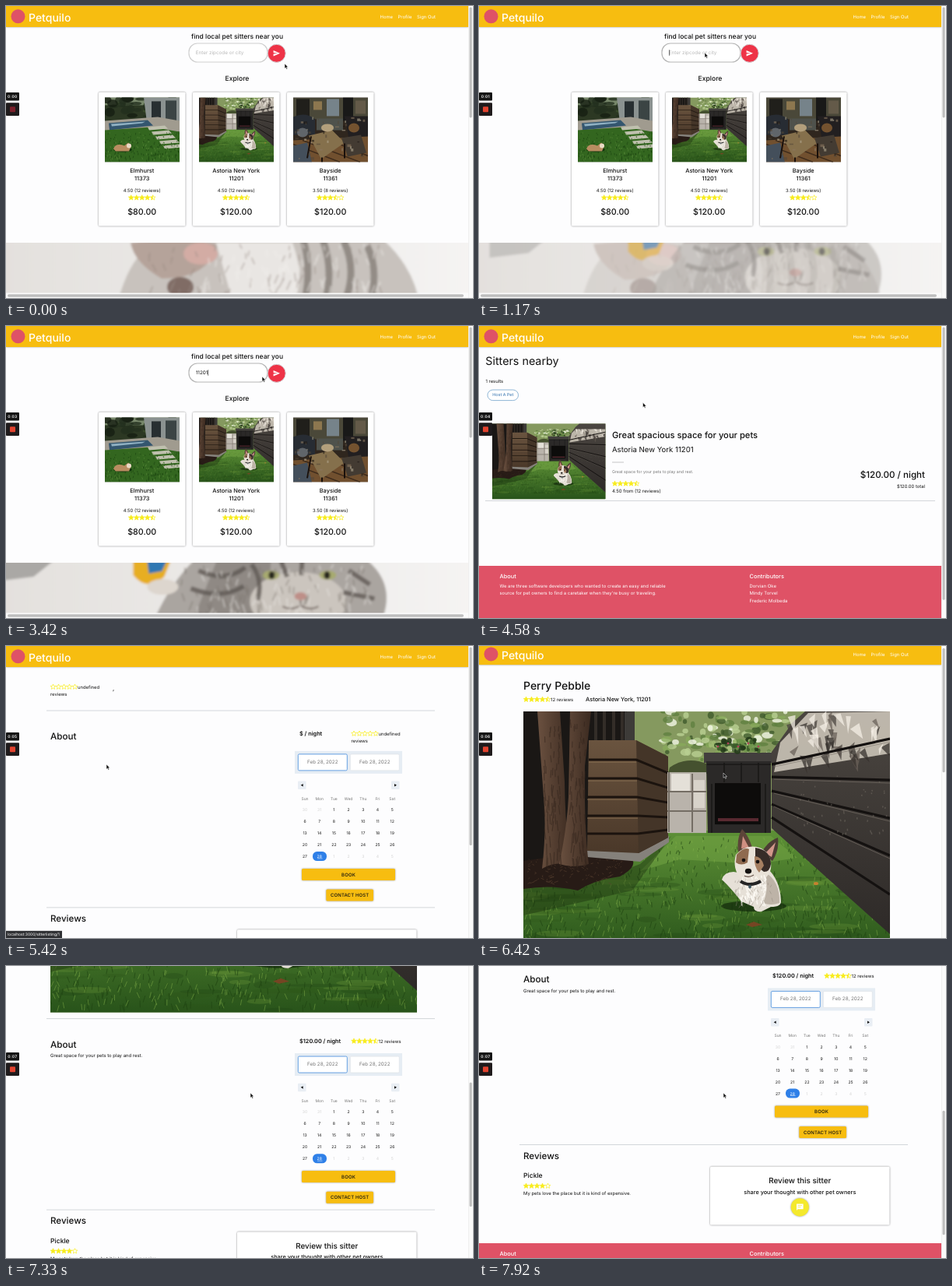
An HTML page that plays this animation: 600x375 px, repeating every 8000 ms.

```html
<!DOCTYPE html>
<html lang="en">
<head>
<meta charset="utf-8">
<title>Pet sitters</title>
<style>
  html, body { margin: 0; width: 100%; height: 100%; overflow: hidden; background: #fdfdfe; }
  svg { display: block; }
  #stage { width: 600px; height: 375px; font-family: Inter, "Open Sans", sans-serif; text-rendering: geometricPrecision; }
  text { fill: #111; white-space: pre; }
  .mid { text-anchor: middle; }
  .end { text-anchor: end; }
  .m { font-weight: 500; }
  .w { fill: #fff; }
  .card { filter: drop-shadow(0 .5px 1px #0007); }
  .btn { filter: drop-shadow(0 .7px .8px #0006); }
</style>
</head>
<body>
<svg id="stage" viewBox="0 0 600 375"></svg>
<script>
const YELLOW = '#f7bd10', RED = '#df5266', STAR = '#f8ec1c', LOOP = 8000, FRAME = 1000 / 12;
const stage = document.getElementById('stage');
const $ = id => document.getElementById(id);

let seed = 7;
const rnd = (a = 0, b = 1) => {
  seed = (seed * 16807) % 2147483647;
  return +(a + (b - a) * seed / 2147483647).toFixed(1);
};
const range = (n, f) => Array.from({ length: n }, (_, i) => f(i)).join('');
const pick = list => list[Math.floor(rnd(0, list.length - .1))];

// markup helpers
const T = (x, y, size, str, cls = '', o = '') => `<text x="${x}" y="${y}" font-size="${size}" class="${cls}" ${o}>${str}</text>`;
const R = (x, y, w, h, fill, o = '') => `<rect x="${x}" y="${y}" width="${w}" height="${h}" fill="${fill}" ${o}/>`;
const P = (d, fill, o = '') => `<path d="${d}" fill="${fill}" ${o}/>`;
const S = (d, color, w, o = '') => P(d, 'none', `stroke="${color}" stroke-width="${w}" ${o}`);
const E = (x, y, rx, ry, fill, o = '') => `<ellipse cx="${x}" cy="${y}" rx="${rx}" ry="${ry}" fill="${fill}" ${o}/>`;
const G = (id, body, o = '') => `<g id="${id}" ${o}>${body}</g>`;
const line = (x1, x2, y) => R(x1, y - .4, x2 - x1, .8, '#c9cdd1');
const grad = (id, c1, c2, o = 'x2="0" y2="1"') =>
  `<linearGradient id="${id}" ${o}><stop stop-color="${c1}"/><stop offset="1" stop-color="${c2}"/></linearGradient>`;
const photo = (id, x, y, w, h, vb, o = '') =>
  `<svg x="${x}" y="${y}" width="${w}" height="${h}" viewBox="0 0 ${vb}" preserveAspectRatio="xMidYMid slice" ${o}><use href="#${id}"/></svg>`;

const starPath = (cx, cy, from) => 'M' + Array.from({ length: 11 - from }, (_, i) => {
  const k = i + from, r = k % 2 ? 1.55 : 3.5, a = (k * 36 - 90) * Math.PI / 180;
  return (cx + r * Math.cos(a)).toFixed(2) + ' ' + (cy + r * Math.sin(a)).toFixed(2);
}).join('L') + 'Z';
const stars = (x, y, n) => range(5, i => {
  const cx = x + 3.5 + i * 7;
  return P(starPath(cx, y, 0), n > i + .9 ? STAR : '#fff', `stroke="${STAR}" stroke-width=".7"`) +
    (n > i && n < i + 1 ? P(starPath(cx, y, 5), STAR) : '');
});

const nav = () => R(0, 0, 594, 27, YELLOW, 'class="btn"') +
  E(15.5, 13.3, 9, 9, RED) + T(29, 20.3, 14, 'Petquilo', 'm w') +
  T(480.5, 15.6, 5.9, 'Home', 'w') + T(503.5, 15.6, 5.9, 'Profile', 'w') + T(528, 15.6, 5.9, 'Sign Out', 'w');

const footer = y => R(0, y, 594, 95, RED) +
  T(26.5, y + 15.7, 7.4, 'About', 'm w') +
  T(26.5, y + 27.8, 5.9, 'We are three software developers who wanted to create an easy and reliable', 'w') +
  T(26.5, y + 37.2, 5.9, "source for pet owners to find a caretaker when they're busy or traveling.", 'w') +
  T(347.5, y + 15.7, 7.4, 'Contributors', 'm w') +
  ['Dorvian Oke', 'Mindy Torvel', 'Frederic Molbeda'].map((n, i) => T(347.5, y + 27.8 + i * 9.4, 5.9, n, 'w')).join('');

// pictures
const tufts = (n, x1, x2, y1, y2, dx, dy) => 'M' + range(n, () => {
  const y = rnd(y1, y2), k = .4 + .6 * (y - y1) / (y2 - y1);
  return `M${rnd(x1, x2)} ${y}l${(rnd(-dx, dx) * k).toFixed(1)} ${(dy * k).toFixed(1)}`;
}).slice(1);

const foliage = () => R(0, 0, 471, 314, '#85995f') +
  range(150, () => E(rnd(180, 350), rnd(0, 62), rnd(2, 8), rnd(2, 5), pick(['#f2f6e6', '#5f8040', '#b9cf92', '#3f5a2c', '#87a95a']), 'opacity=".8"')) +
  P('M188 72Q210 56 238 68V80H186Z', '#45512f');

const lawn = () => P('M0 226L140 187L190 153H325L471 285V314H0Z', 'url(#lawn)') +
  P('M196 160H318L352 188L300 196L200 190L150 205Z', '#74a444', 'opacity=".55"') +
  range(60, () => E(rnd(0, 440), rnd(215, 312), rnd(12, 40), rnd(2, 5), pick(['#1f4212', '#6f9c3c', '#2b5418']), 'opacity=".28"')) +
  S(tufts(500, 0, 471, 165, 314, 4, -9), '#1f4311', 1.1, 'opacity=".6"') +
  S(tufts(420, 0, 471, 165, 314, 4, -8), '#84b04a', .9, 'opacity=".55"') +
  P('M0 226Q80 224 150 196L190 160L140 230L0 262Z', '#142a0c', 'opacity=".4"');

const leftSide = () => P('M0 0H133V200H0Z', '#1a1715') + S('M93 0V150M104 0V40M116 0V40M127 0V40', '#332d28', 4) + R(130, 0, 13, 38, '#3d3b38') +
  P('M0 192Q70 180 140 190Q146 200 124 212Q92 216 70 230Q36 222 0 228Z', '#271b16') + S(tufts(120, 5, 125, 190, 222, 6, -2), '#57402f', 1, 'opacity=".6"') +
  P('M82 177L148 181L187 160V168L150 193L82 187Z', '#85817b') +
  P('M84 37H145L186 58V162L148 182L82 179Z', 'url(#cedar)') + P('M145 37L186 58V162L148 182Z', '#443528') +
  S('M84 62H145L186 79M83 86H146L186 98M82 110H146L186 117M82 134H147L186 136M82 157H147L186 152', '#1b130e', 3) +
  S('M84 65H145M83 89H146M82 113H146M82 137H147', '#8c7255', 1.2, 'opacity=".7"') +
  P('M18 0H47L53 90Q54 160 62 200Q44 190 24 202Q30 150 26 110Z', 'url(#bark)') +
  P('M60 0H87L79 70Q78 150 84 196Q66 202 46 196Q56 150 58 110Z', 'url(#bark)') +
  S(tufts(70, 26, 48, 10, 190, 3, 16) + tufts(70, 60, 80, 10, 190, 3, 16), '#30221a', 1.2, 'opacity=".5"');

const kennel = () => R(185, 78, 50, 78, '#b9b3ab') + R(190, 80, 24, 22, '#e4e0d8') + R(219, 88, 14, 36, '#d8d3ca') +
  S('M185 103H235M185 128H235M217 80V155M187 78V155', '#746d64', 2) +
  P('M232 53H319V66H232Z', '#423f3d') + P('M235 64H318V156H237Z', '#2b2928') + R(246, 92, 59, 53, '#0d0c0b') +
  R(250, 137, 52, 4, '#5a2a31') + S('M236 68H318M258 66V91M280 66V91M302 66V91M242 93V156M311 93V156', '#171615', 1.4) +
  range(44, () => E(rnd(240, 312), rnd(36, 51), rnd(2, 5), rnd(2, 4), pick(['#3a5a28', '#6d944a', '#243a1a', '#a1bb74']), 'opacity=".9"')) +
  range(5, i => E(250 + i * 13, 45 - i % 2 * 4, 1.4, 1.4, '#b1445a'));

const fence = () => P('M319 52L346 14L362 0H471V286L319 150Z', 'url(#slats)') +
  P('M330 40L366 2L471 0V54L322 78Z', '#d2cabe', 'opacity=".85"') +
  range(46, () => P(`M${rnd(325, 460)} ${rnd(2, 62)}l${rnd(4, 12)} ${rnd(-8, 2)}l${rnd(-6, 6)} ${rnd(12, 24)}Z`, pick(['#4b443f', '#37312e', '#6b625a', '#f4eee4']), 'opacity=".75"')) +
  S('M319 68L471 35M319 84L471 88M319 102L471 137M319 119L471 185M319 136L471 235', '#141110', 3.2) +
  S('M322 71L471 39M322 87L471 92M322 105L471 141M322 122L471 189', '#7d756d', 1, 'opacity=".6"') +
  S(tufts(50, 350, 470, 80, 160, 1, 3), '#837a70', 1.5, 'opacity=".4"');

const pup = () => E(296, 250, 42, 7, '#12290a', 'opacity=".7"') +
  P('M255 216Q258 206 270 206L282 208L312 200Q330 216 331 243Q332 251 318 251L306 257Q296 258 296 251L280 244Q266 226 255 216Z', '#e6e0d7') +
  P('M310 206Q330 218 329 246Q318 250 308 246Q316 228 310 206Z', '#bdb3a7') +
  P('M276 180Q274 162 281 151Q290 160 295 178Z', '#5c4439') + P('M280 176L282 160L290 175Z', '#cf8f82') +
  P('M306 182Q312 168 327 162Q329 178 320 192Z', '#4c3b34') + P('M311 182L324 168L319 187Z', '#d2978a') +
  P('M273 184Q284 171 300 174Q316 178 318 194Q320 210 306 217Q294 223 280 216Q268 202 273 184Z', '#e9e2d8') +
  P('M274 184Q284 173 290 177L288 194Q280 199 273 194Z', '#8f6a4f') +
  P('M298 175Q318 178 318 196Q317 206 309 206Q300 200 298 190Z', '#372c28') + P('M297 186Q306 186 309 198L303 207Q296 200 297 186Z', '#a67f61') +
  S(tufts(70, 276, 312, 208, 244, 4, 7), '#fffdf8', 1.5, 'opacity=".8"') + S(tufts(40, 272, 322, 214, 248, 4, 6), '#8f867b', .9, 'opacity=".5"') +
  E(283, 191, 2.4, 2.4, '#17110f') + E(301, 193, 2.4, 2.4, '#17110f') + E(289, 205, 4.2, 3.4, '#141110') +
  S('M284 211Q290 214 296 210', '#6c5950', 1.2) + S('M279 218Q291 226 305 218', '#252425', 4) + E(291, 225, 2, 2.4, '#3f5560') +
  P('M286 274L296 270L307 274L294 277Z', '#754523') + E(376, 221, 3, 2, '#c7812f');

const dog = () => foliage() + lawn() + leftSide() + kennel() + fence() + pup();

const yard = () => R(0, 0, 96, 83, '#2c3823') + R(0, 0, 96, 10, '#77876a') +
  range(40, () => E(rnd(0, 96), rnd(0, 25), rnd(3, 8), rnd(2, 6), pick(['#161f12', '#3d4f2e', '#24301f']), 'opacity=".8"')) +
  P('M50 0H96V32H54Z', '#8b9290') + R(60, 5, 12, 22, '#282f31') + R(78, 4, 14, 27, '#3b4444') +
  P('M0 30L68 25L96 30V44H0Z', '#a09b8f') + P('M5 33L55 29L62 36L6 42Z', '#34566f') + P('M8 34L52 31L48 33L9 37Z', '#8fb0c2') +
  P('M0 42L60 38L96 44V83H0Z', '#33661f') + range(5, i => P(`M${55 + i * 5} ${38 + i * 6}l22 -2l4 4l-24 2Z`, '#bfc0ae')) +
  S(tufts(160, 0, 96, 46, 83, 1, -3), '#1e4712', .8) + S(tufts(80, 0, 96, 46, 83, 1, -3), '#5c8c3b', .6) +
  E(23, 67, 12, 3, '#14330e') + P('M11 66Q14 58 25 62L30 58L34 62L31 69L14 69Z', '#b98d61') + E(31, 62, 3, 3, '#eadbc6');

const room = () => R(0, 0, 96, 83, '#2f261e') + R(0, 0, 96, 28, '#4a4839') +
  R(4, 2, 17, 22, '#201f1b') + R(26, 5, 11, 11, '#8d774f') + R(43, 2, 16, 22, '#76838a') + R(64, 0, 13, 30, '#191918') + R(80, 4, 13, 17, '#645a49') +
  P('M0 25Q16 18 28 28V48H0Z', '#272c33') + P('M30 27H64V42H30Z', '#4f524c') + P('M66 24H96V55H72Z', '#221f20') +
  P('M0 55L96 50V83H0Z', '#71502f') + S('M0 60L60 83M12 55L86 83M40 52L96 75', '#3f2c1c', 1.6) +
  P('M20 49L50 42L66 58L36 79Z', '#85704c') + P('M62 52L87 48L94 71L70 76Z', '#433b32') + P('M0 62L18 58L24 83H0Z', '#444f5b') +
  E(44, 39, 8, 5, '#b29f7c') + E(78, 39, 7, 6, '#74522f') + E(12, 45, 7, 6, '#60656a') + S('M23 50L18 78M66 59V78M37 77V83', '#19100b', 2) +
  range(40, () => R(rnd(0, 92), rnd(24, 78), rnd(1, 5), rnd(1, 4), pick(['#1b1613', '#8a7760', '#55483a', '#b3a892']), 'opacity=".6"'));

const fur = (x1, x2, color) => S(tufts(60, x1, x2, 304, 366, 8, 14), color, 1.6, 'opacity=".55"');
const video = () => `<g clip-path="url(#vid)"><g filter="url(#soft)">` + R(-10, 300, 620, 80, 'url(#wall)') +
  G('nap', P('M145 375Q165 305 205 303L480 296Q520 330 530 375Z', '#c8c2bd') +
    P('M160 304Q230 296 270 306Q262 350 200 350Q165 330 160 304Z', '#b5a39a') + E(250, 318, 22, 14, '#d3aca4') +
    E(224, 361, 17, 13, '#806c65') + P('M270 304H368Q385 350 370 375H290Z', '#e9e6e3') +
    S('M382 300Q392 336 385 372M407 300Q420 336 412 372M434 302Q450 336 438 372M464 308Q478 336 470 372', '#827a75', 9, 'opacity=".75"') +
    fur(170, 480, '#958982') + fur(250, 500, '#f3f0ed')) +
  G('play', P('M0 300H75L50 320L0 326Z', '#aaa8a5') + P('M205 375Q225 330 255 300H480Q515 330 498 375Z', '#aaa5a0') +
    P('M285 300H355L350 375H255Z', '#8f8984') + E(390, 352, 62, 38, '#cbc5be') +
    S('M262 312Q296 328 322 308M252 335Q292 350 320 332M330 304Q345 322 338 350M368 300L376 320M395 300L394 318M455 312L482 330M448 340L488 348', '#5f5954', 6, 'opacity=".8"') +
    E(355, 318, 11, 6, '#a7aa70') + E(428, 318, 11, 6, '#a7aa70') + E(356, 318, 4, 5, '#28251f') + E(427, 318, 4, 5, '#28251f') +
    E(393, 345, 8, 5, '#be8f88') + S('M393 350V357Q380 364 370 358M393 357Q406 364 416 358', '#756963', 2) +
    fur(240, 480, '#78716b') + fur(260, 480, '#ede9e5') +
    P('M178 300H226L218 320Q196 340 178 318Z', '#e7ae24') + P('M196 300H221L215 313L198 316Z', '#2d77b2') + E(216, 333, 20, 10, '#ddd6ce')) + '</g></g>';

// pages
const home = () => nav() +
  T(297, 42, 8.5, 'find local pet sitters near you', 'mid m') +
  R(235, 48, 101, 24, '#fff', 'id="field" rx="11" stroke="#cfcfcf" stroke-width="1.2"') +
  T(243.8, 62.2, 6.3, '', '', 'id="query"') + R(0, 56.3, .6, 7.4, '#111', 'id="caret"') +
  E(347.7, 60.8, 11.5, 11.5, '#ee3347', 'stroke="#d3d3d6" stroke-width="1"') +
  P('M343.6 57L352 60.8L343.6 64.6V61.6L349.4 60.8L343.6 60Z', '#fff') +
  T(297, 96, 8.6, 'Explore', 'mid m') +
  [['Elmhurst', '11373', 4.5, '12', '$80.00', 'yard', '96 83'],
   ['Astoria New York', '11201', 4.5, '12', '$120.00', 'dog', '471 314'],
   ['Bayside', '11361', 3.5, '8', '$120.00', 'room', '96 83']].map(([town, zip, score, count, price, pic, vb], i) => {
    const x = 119 + i * 121, c = x + 55.7;
    return R(x, 110.7, 111.5, 171.8, '#fff', 'class="card" rx="1.5"') + photo(pic, x + 8, 117.4, 96, 83, vb) +
      T(c, 214.2, 7.4, town, 'mid m') + T(c, 223.5, 7.4, zip, 'mid m') +
      T(c, 239, 5.95, `${score}0 (${count} reviews)`, 'mid') + stars(c - 17.5, 246.2, score) + T(c, 267.6, 10.7, price, 'mid m');
  }).join('') + video() +
  G('hints', R(235, 72, 101, 52, '#fff', 'class="card"') + ['11201', '11361', '11'].map((v, i) => T(239.8, 85.2 + i * 15, 5.6, v, 'm')).join('')) +
  R(0, 368.7, 600, 6.3, '#fafafa') + R(2, 370.3, 586, 3.4, '#bdbdbd', 'rx="1.7"');

const results = () => nav() + T(8.3, 50, 14.3, 'Sitters nearby') + T(8.5, 73, 5.9, '1 results') +
  R(11, 82, 39.5, 13.6, '#fff', 'rx="6.8" stroke="#73a4cc" stroke-width=".8"') + T(30.8, 90.4, 5.4, 'Host A Pet', 'mid', 'style="fill:#2a6cab"') +
  photo('dog', 17, 132.4, 145.5, 83, '471 314', 'style="clip-path:inset(0 round 4px)"') +
  T(171, 144.4, 11.2, 'Great spacious space for your pets', 'm') + T(171, 161.8, 9.6, 'Astoria New York 11201') +
  R(171, 174.6, 15, .8, '#b7b7b7') + T(171, 189.2, 5.25, 'Great space for your pets to play and rest.', '', 'style="fill:#777"') +
  stars(171, 202.4, 4.5) + T(171, 213.9, 5.95, '4.50 from (12 reviews)') +
  T(573, 194.5, 11.6, '$120.00 / night', 'end m') + T(573, 207.6, 5.9, '$120.00 total', 'end') +
  line(8, 586, 224.5) + footer(308);

const calendar = () => {
  const col = i => 384 + i * 18.7, faint = 'style="fill:#d3d3d3"';
  return R(375, 67, 10.5, 10.5, '#e9eef4', 'rx="1"') + R(495, 67, 10.5, 10.5, '#e9eef4', 'rx="1"') +
    P('M381.7 70.5V74L378.7 72.2Z', '#111') + P('M499 70.5V74L502 72.2Z', '#111') +
    ['Sun', 'Mon', 'Tue', 'Wed', 'Thu', 'Fri', 'Sat'].map((d, i) => T(col(i), 91.2, 5, d, 'mid', 'style="fill:#777"')).join('') +
    R(394, 157.6, 18, 12, '#2f80e8', 'rx="5.5"') + R(400, 166.2, 6.5, .5, '#fff') +
    range(35, i => {
      const n = i - 1, day = n < 1 ? 31 + n : n > 28 ? n - 28 : n;
      return T(col(i % 7), 105.5 + Math.floor(i / 7) * 15, 5.1, day, n === 28 ? 'mid w' : 'mid', n < 1 || n > 28 ? faint : '');
    });
};
const dateBox = (x, border) => R(x, 32.4, 63, 21, '#fff', `rx="1.5" stroke="${border}" stroke-width=".9"`) +
  T(x + 31.5, 44.2, 6.3, 'Feb 28, 2022', 'mid', 'style="fill:#777"');
const button = (x, y, w, label) => R(x, y, w, 15, YELLOW, 'class="btn" rx="1.5"') + T(x + w / 2, y + 9.8, 6, label, 'mid m', 'letter-spacing=".15"');

const listing = () => G('top', nav() + G('intro', T(57, 59.2, 14, 'Perry Pebble', 'm') + stars(57, 71.5, 4.5) + T(92, 73.8, 5.9, '12 reviews') +
    T(137, 74, 7.4, 'Astoria New York, 11201', 'm') + photo('dog', 57, 87, 471, 314, '471 314'))) +
  G('pending', stars(57, 52.5, 0) + T(92, 54.8, 5.9, 'undefined') + T(57, 64.2, 5.9, 'reviews') + T(137, 57, 7.3, ',', 'm') +
    T(377, 114.8, 7.3, '$ / night', '', 'font-weight="600"') + stars(443.5, 112.5, 0) + T(478.5, 114.8, 5.9, 'undefined') + T(443.5, 124.2, 5.9, 'reviews')) +
  G('about', line(52, 551, -16) + T(57, 21, 11.7, 'About', 'm') +
    G('facts', T(57, 33.8, 5.95, 'Great space for your pets to play and rest.') + T(377, 15.4, 7.3, '$120.00 / night', '', 'font-weight="600"') +
      stars(443.5, 12.8, 4.5) + T(478.5, 15, 5.9, '12 reviews'))) +
  G('lower', R(371, 28.4, 138, 29, '#e6edf4') + dateBox(375.3, '#5596df') + dateBox(442.3, '#e2e6ea') + calendar() +
    button(380, 179.4, 120, 'BOOK') + button(411.3, 206, 60.7, 'CONTACT HOST') + line(52, 551, 229.4) +
    T(57, 247.6, 11.6, 'Reviews', 'm') +
    G('review', T(57, 272, 8.6, 'Pickle', 'm') + stars(57, 282.5, 4) + T(57, 294, 5.95, 'My pets love the place but it is kind of expensive.')) +
    R(297, 257.8, 230.5, 74.6, '#fff', 'class="card" rx="1.5"') + T(412.3, 279.3, 9.9, 'Review this sitter', 'mid m') +
    T(412.3, 292.6, 7.3, 'share your thought with other pet owners', 'mid m') + E(412.3, 309.8, 11.6, 11.6, '#f4e92d', 'class="btn"') +
    P('M408 305.5H416.6V312.2H409.6L408 314Z', '#fff') + S('M409.5 307.6H415M409.5 309.7H413.5', '#f4e92d', .7) + footer(356));

stage.innerHTML = '<defs>' + grad('lawn', '#5d9036', '#28531a') + grad('wall', '#e3e0dd', '#f5f4f3', 'x2="1" y2="0"') +
  grad('cedar', '#6a543f', '#4a3829') + grad('bark', '#6b5140', '#3b2a20', 'x2="1" y2="0"') + grad('slats', '#4b4641', '#2e2a28') +
  '<filter id="soft" x="-5%" y="-20%" width="110%" height="140%"><feGaussianBlur stdDeviation="1.6"/></filter>' +
  '<clipPath id="vid"><rect y="304" width="594" height="64.7"/></clipPath>' +
  G('dog', dog()) + G('yard', yard()) + G('room', room()) + '</defs>' +
  R(0, 0, 600, 375, '#fdfdfe') + G('home', home()) + G('results', results()) + G('listing', listing()) +
  R(594, 0, 6, 375, '#fafafa') + R(594, 0, .5, 375, '#e5e5e5') + R(595.5, 2, 3.2, 100, '#bdbdbd', 'id="thumb" rx="1.6"') +
  G('status', R(0, 365.8, 72, 9.2, '#303134') + T(2, 372.3, 5, 'localhost:3000/sitterlisting/1', 'w')) +
  R(0, 111, 17, 10.5, '#151515', 'rx="1"') + T(8.3, 118.1, 4.9, '', 'mid w', 'id="clock" font-weight="600" letter-spacing=".3"') +
  R(0, 124.3, 17, 16.8, '#1f1b1c', 'rx="1"') + R(5, 129.3, 7, 7, '#e2432f', 'id="dot" rx="1"') +
  G('arrow', P('M0 0V6.3L1.5 5L2.5 7.3L3.6 6.8L2.6 4.6H4.5Z', '#111', 'stroke="#fff" stroke-width=".5"'));

// motion: [time, values...]
const MOUSE = [[0, 358, 74], [250, 356, 73], [900, 290, 60], [2500, 290, 60], [2900, 250, 82], [3050, 250, 82], [3500, 347, 61],
  [3850, 347, 61], [4400, 212, 98], [4580, 211, 98], [5150, 129, 152], [5600, 129, 152], [6100, 314, 163]];
const SCROLL = [[6330, 0], [6420, 3], [6500, 22], [6580, 58], [6670, 105], [6750, 145], [6835, 178.5], [7000, 243], [7250, 322], [7500, 380], [7750, 416], [7900, 425]];
const TYPED = [[0, ''], [1830, '1'], [2080, '11'], [3000, '11201']];

const at = (table, t) => {
  const i = table.findIndex(r => r[0] > t);
  if (i < 1) return (i ? table[table.length - 1] : table[0]).slice(1);
  const a = table[i - 1], b = table[i], k = (t - a[0]) / (b[0] - a[0]);
  return a.slice(1).map((v, j) => v + (b[j + 1] - v) * k);
};
const show = (id, on) => $(id).setAttribute('display', on ? 'inline' : 'none');
const move = (id, x, y) => $(id).setAttribute('transform', `translate(${x.toFixed(2)} ${y.toFixed(2)})`);
const set = (id, o) => Object.entries(o).forEach(([k, v]) => $(id).setAttribute(k, v));

function draw(t) {
  const page = t < 3740 ? 'home' : t < 5320 ? 'results' : 'listing';
  ['home', 'results', 'listing'].forEach(p => show(p, p === page));
  const loaded = t >= 5570, [scroll] = at(SCROLL, t);

  if (page === 'home') {
    const text = TYPED.filter(r => r[0] <= t).pop()[1], focus = t > 980;
    $('query').textContent = text || 'Enter zipcode or city';
    $('query').style.fill = text ? '#111' : '#b9b9b9';
    set('field', { stroke: focus ? '#b5b5b5' : '#cfcfcf' });
    show('hints', t >= 1830 && t < 3000);
    show('caret', focus && (text || t % 1000 < 500));
    set('caret', { x: 244 + (text ? $('query').getComputedTextLength() : 0) });
    const mix = Math.min(1, Math.max(0, (t - 700) / 900));
    set('nap', { opacity: 1 - mix });
    set('play', { opacity: mix });
    move('nap', -t / 90, Math.sin(t / 500) * 2);
    move('play', (2250 - t) / 80, Math.sin((t - 2250) / 450) * 4);
  } else if (page === 'listing') {
    ['intro', 'facts', 'review'].forEach(id => show(id, loaded));
    show('pending', !loaded);
    move('top', 0, -scroll);
    move('about', 0, loaded ? 425 - scroll : 99);
    move('lower', 0, loaded ? 425 - scroll : 106.5);
  }

  const height = page === 'home' ? 970 : page === 'results' ? 398 : loaded ? 865 : 546, ratio = 375 / height;
  set('thumb', { y: 1.5 + scroll * ratio, height: 375 * ratio - 3 });
  show('status', t >= 5160 && t < 5740);
  $('clock').textContent = '0:0' + Math.floor((t + 5) / 1000);
  set('dot', { fill: t < 400 ? '#7b202b' : '#e2432f' });
  show('arrow', t < 1830 || t >= 2500);
  move('arrow', ...at(MOUSE, t));
}

const start = performance.now();
function tick(now) {
  const t = Math.max(0, now - start) % LOOP;
  draw(Math.min(95, Math.floor((t + 5) / FRAME)) * FRAME);
  requestAnimationFrame(tick);
}
draw(0);
requestAnimationFrame(tick);
</script>
</body>
</html>
```
